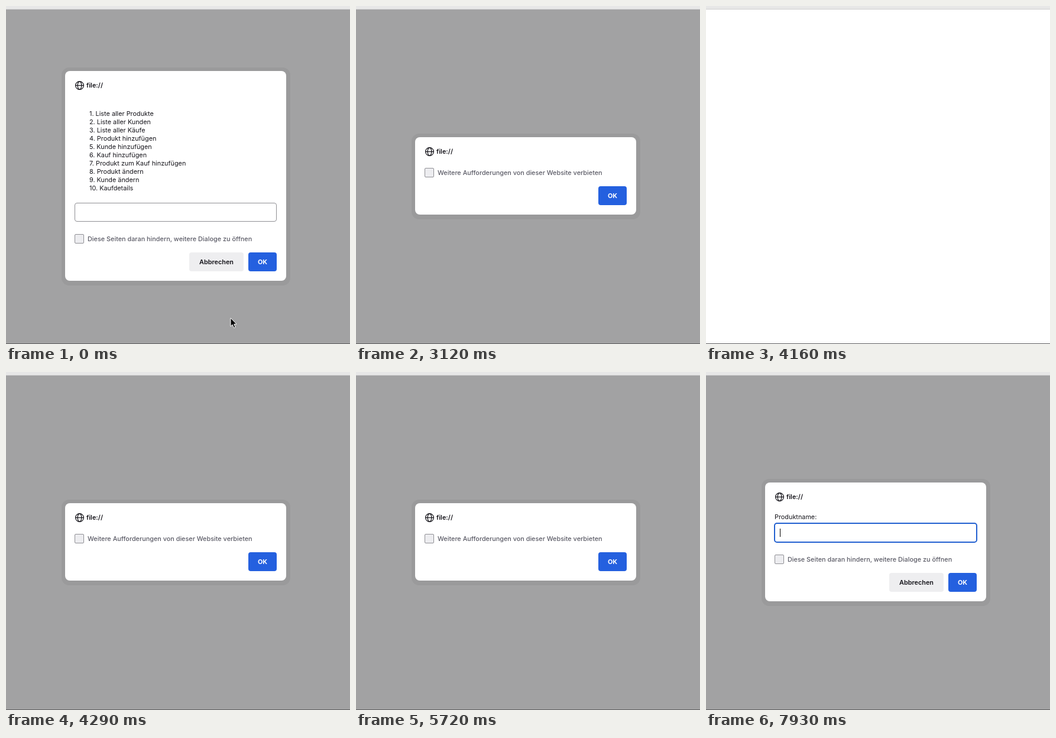
Recreate the animation shown at these times as an HTML page. Size 582x572 px, loop 8 s.

```html
<!DOCTYPE html>
<html lang="de">
<head>
<meta charset="utf-8">
<title>Dialoge</title>
<style>
  html, body { margin: 0; width: 100%; height: 100%; overflow: hidden; background: #fff; }
  svg { display: block; }
  text { font: 10.85px Inter, "Open Sans", sans-serif; fill: #15141a; white-space: pre; }
  .bold { font-weight: 600; }
  .label { fill: #5b5b66; font-weight: 450; }
</style>
</head>
<body>
<svg id="stage" width="582" height="572" viewBox="0 0 582 572"></svg>
<script>
const LOOP = 8000, TICK = 130;
const stage = document.getElementById('stage');

const MENU = ['Liste aller Produkte', 'Liste aller Kunden', 'Liste aller Käufe',
  'Produkt hinzufügen', 'Kunde hinzufügen', 'Kauf hinzufügen',
  'Produkt zum Kauf hinzufügen', 'Produkt ändern', 'Kunde ändern', 'Kaufdetails'];
const BLOCK = 'Diese Seiten daran hindern, weitere Dialoge zu öffnen';
const FORBID = 'Weitere Aufforderungen von dieser Website verbieten';

const DIALOGS = {
  menu: { top: 110, bottom: 465, label: BLOCK, input: true,
    lines: MENU.map((line, i) => [141, 186 + 14 * i, `${i + 1}. ${line}`]) },
  alert: { top: 222, bottom: 353, label: FORBID, input: false, lines: [] },
  name: { top: 187, bottom: 388, label: BLOCK, input: true,
    lines: [[116, 249, 'Produktname:']] },
};

// start time, dialog, typed value, caret visible, input focused
const STATES = [
  [0, 'menu', '', false, false],
  [1430, 'menu', '', true, true],
  [1950, 'menu', '', false, true],
  [2080, 'menu', '1', true, true],
  [2340, 'alert'],
  [3510, 'menu', '', true, true],
  [3900, 'menu', '2', true, true],
  [4160, null],
  [4290, 'alert'],
  [4810, 'menu', '', true, true],
  [5330, 'menu', '3', true, true],
  [5720, 'alert'],
  [5980, 'menu', '', true, true],
  [6370, 'menu', '', false, true],
  [6760, 'menu', '', true, true],
  [7280, 'menu', '', false, true],
  [7410, 'menu', '4', true, true],
  [7930, 'name', '', true, true],
];

// time, x, y
const POINTER = [[0, 380, 528], [520, 350, 494], [650, 350, 494], [1560, 267, 348]];
const POINTER_HIDDEN = 2080;

const rect = (x, y, w, h, fill, r = 0, extra = '') =>
  `<rect x="${x}" y="${y}" width="${w}" height="${h}" rx="${r}" fill="${fill}" ${extra}/>`;
const text = (x, y, content, extra = '') => `<text x="${x}" y="${y}" ${extra}>${content}</text>`;

function globe(y) {
  return `<g transform="translate(124.5 ${y})" fill="none" stroke="#15141a" stroke-width="1.25">
    <circle r="6.9"/><ellipse rx="3.3" ry="6.9"/><path d="M-6.9 0H6.9"/></g>`;
}

function inputField(bottom, value, caret, focused) {
  const y = bottom - 132;
  const frame = focused
    ? rect(116, y, 342, 32, '#fff', 4, 'stroke="#2260d0" stroke-width="2"')
    : rect(116.5, y + .5, 341, 31, '#fff', 3.5, 'stroke="#8f8f94"');
  return frame + text(125, y + 20, value)
    + (caret ? rect(value ? 132 : 125, y + 9, 1, 14, '#000') : '');
}

function dialog({ top, bottom, label, input, lines }, value, caret, focused) {
  const buttonY = bottom - 48;
  return rect(94, top - 6, 387, bottom - top + 14, '#9a9a9b', 13)
    + rect(100, top, 374, bottom - top, '#fff', 8)
    + globe(top + 24.5)
    + text(136, top + 28, 'file://', 'class="bold"')
    + lines.map(line => text(...line)).join('')
    + (input ? inputField(bottom, value, caret, focused) : '')
    + rect(116.5, bottom - 78.5, 15, 15, '#ededf0', 1.5, 'stroke="#8f8f94"')
    + text(138, bottom - 67, label, 'class="label"')
    + (input ? rect(310, buttonY, 92, 32, '#eeeef0', 4)
      + text(356, buttonY + 20, 'Abbrechen', 'class="bold" text-anchor="middle"') : '')
    + rect(410, buttonY, 48, 32, '#2460df', 4)
    + text(434, buttonY + 20, 'OK', 'text-anchor="middle" style="fill:#fff;font-weight:700"');
}

function pointerAt(t) {
  const next = POINTER.findIndex(p => p[0] > t);
  if (next < 0) return POINTER[POINTER.length - 1].slice(1);
  const [t0, x0, y0] = POINTER[next - 1], [t1, x1, y1] = POINTER[next];
  const u = (t - t0) / (t1 - t0), k = u * u * (3 - 2 * u);
  return [x0 + (x1 - x0) * k, y0 + (y1 - y0) * k];
}

function pointer(t) {
  if (t >= POINTER_HIDDEN) return '';
  const [x, y] = pointerAt(t);
  const beam = y < 365;
  const shape = beam
    ? '<path d="M-3 -7.5Q0 -7.5 .5 -6Q1 -7.5 4 -7.5M.5 -6V6.5M-3 8Q0 8 .5 6.5Q1 8 4 8M-1.5 3.5H2.5" fill="none" stroke="#111"/>'
    : '<path d="M0 0V14.2L3.2 11.2L5.6 16.7L8 15.7L5.7 10.3H10Z" fill="#000" stroke="#fff" stroke-linejoin="round"/>';
  return `<g transform="translate(${x.toFixed(1)} ${y.toFixed(1)})">${shape}</g>`;
}

function draw(t) {
  const [, name, value, caret, focused] = STATES.filter(s => s[0] <= t).pop();
  const darkEdge = t >= 130 && t < 2340;
  return rect(0, 0, 582, 572, name ? '#a2a2a3' : '#fff')
    + rect(0, 0, 582, 5, '#e7e7e7')
    + rect(0, 5, 582, 1, darkEdge ? '#858587' : '#d0d0d1')
    + (name ? dialog(DIALOGS[name], value, caret, focused) : '')
    + rect(0, 571, 582, 1, '#5c5c5e')
    + pointer(t);
}

let shown = '';
function update(now) {
  const t = Math.floor((now % LOOP) / TICK) * TICK;
  const picture = draw(t);
  if (picture !== shown) stage.innerHTML = shown = picture;
}

const start = performance.now();
function loop() {
  update(performance.now() - start);
  requestAnimationFrame(loop);
}
loop();
</script>
</body>
</html>
```
